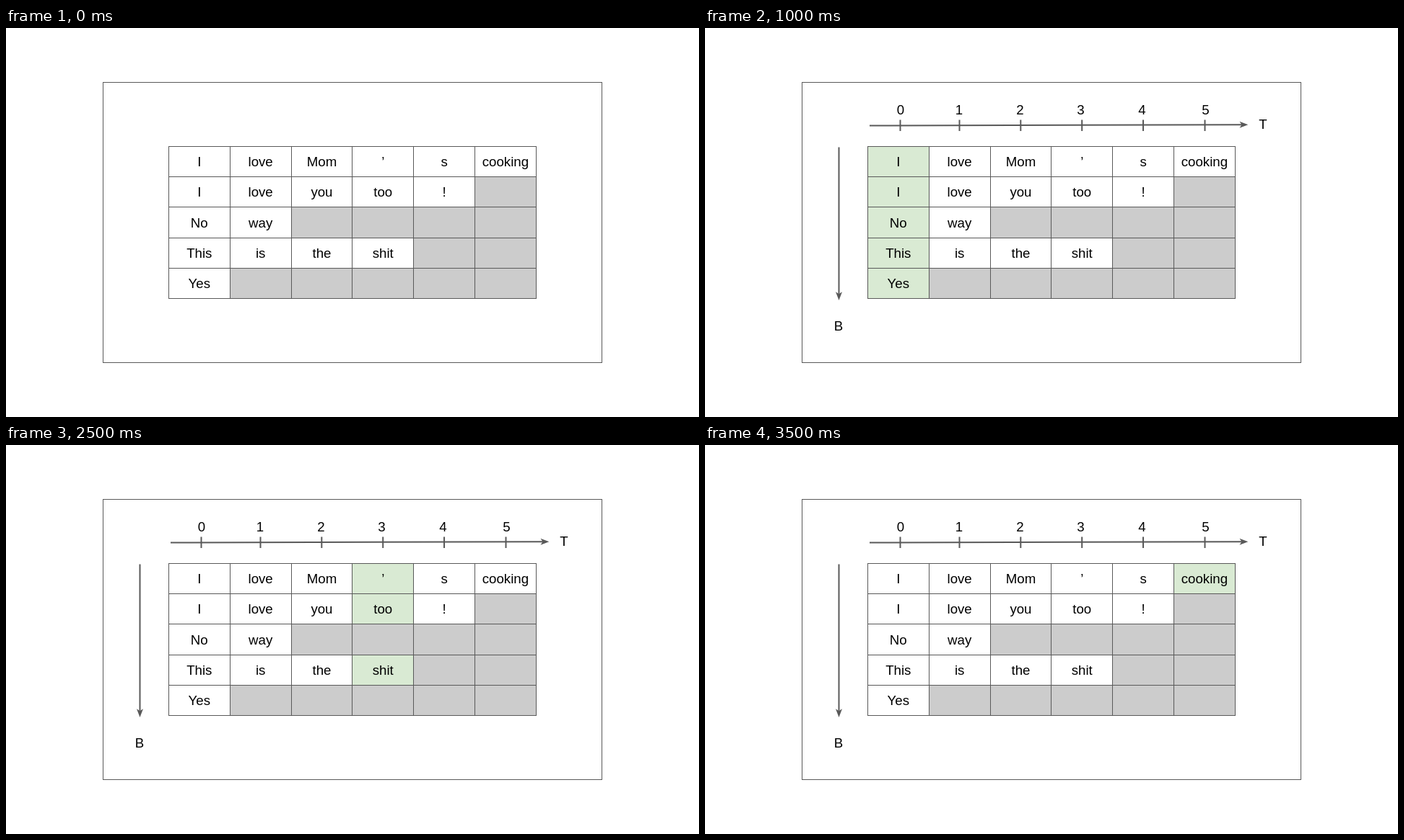
An HTML page for the animation above (4 s loop, 960 px wide and 540 px high).

```html
<!DOCTYPE html>
<html lang="en">
<head>
<meta charset="utf-8">
<title>Padded batch, read step by step</title>
<style>
  html, body { margin: 0; width: 100%; height: 100%; overflow: hidden; background: #fff; }
  svg { display: block; width: 960px; height: 540px; }
  text { font: 18.667px "Liberation Sans", Arial, sans-serif; text-anchor: middle; fill: #000; }
  .line { fill: none; stroke: #595959; }
  .axis { fill: none; stroke: #595959; stroke-width: 2; }
  .head { fill: #595959; }
</style>
</head>
<body>
<svg id="stage" viewBox="0 0 960 540">
  <rect class="line" x="134.5" y="75.5" width="691" height="389"/>
  <g id="table"></g>
  <g id="axes">
    <path class="axis" d="M228 135.5L745 134.2M185.5 165.5V371"/>
    <path class="head" d="M752.3 134.2L740.5 138.7L743.5 134.2L740.5 129.7Z"/>
    <path class="head" d="M185.5 378L181 366.2L185.5 369.2L190 366.2Z"/>
    <text x="773" y="140">T</text>
    <text x="185" y="420">B</text>
  </g>
</svg>
<script>
const STEP = 500, LOOP = 4000;
const COLS = 6;
const rows = [
  ["I", "love", "Mom", "’", "s", "cooking"],
  ["I", "love", "you", "too", "!"],
  ["No", "way"],
  ["This", "is", "the", "shit"],
  ["Yes"]
];
const colX = [225, 310, 395, 479, 564, 649, 734];
const rowY = [164, 206, 248, 291, 333, 375];
const labelX = [271, 352, 436.5, 520.5, 605.5, 693.5];
const tickX = [270.5, 352.5, 437.3, 522.2, 607, 692.5];

const table = document.getElementById("table");
const axes = document.getElementById("axes");

function add(parent, tag, attrs, content) {
  const el = document.createElementNS("http://www.w3.org/2000/svg", tag);
  for (const key in attrs) el.setAttribute(key, attrs[key]);
  if (content) el.textContent = content;
  parent.appendChild(el);
  return el;
}

const cells = [];
for (let r = 0; r < rows.length; r++) {
  for (let c = 0; c < COLS; c++) {
    const word = rows[r][c];
    const rect = add(table, "rect", {
      x: colX[c] + 0.5, y: rowY[r] + 0.5,
      width: colX[c + 1] - colX[c], height: rowY[r + 1] - rowY[r],
      fill: word ? "#fff" : "#ccc", stroke: "#595959"
    });
    if (!word) continue;
    cells.push({ rect, c });
    add(table, "text", { x: 267.8 + 84.83 * c, y: Math.round(192.2 + 42.2 * r) }, word);
  }
}

for (let c = 0; c < COLS; c++) {
  add(axes, "path", { class: "axis", d: `M${tickX[c]} 127.5V143` });
  add(axes, "text", { x: labelX[c], y: 120 }, String(c));
}

// Step 0: table only; step 1: axes; steps 2 to 7: one column lit at a time.
function draw(ms) {
  const step = Math.floor((ms % LOOP) / STEP);
  axes.setAttribute("visibility", step > 0 ? "visible" : "hidden");
  for (const { rect, c } of cells) {
    rect.setAttribute("fill", c === step - 2 ? "#d9ead3" : "#fff");
  }
}

const start = performance.now();
function tick() {
  draw(performance.now() - start);
  requestAnimationFrame(tick);
}
draw(0);
requestAnimationFrame(tick);
</script>
</body>
</html>
```
